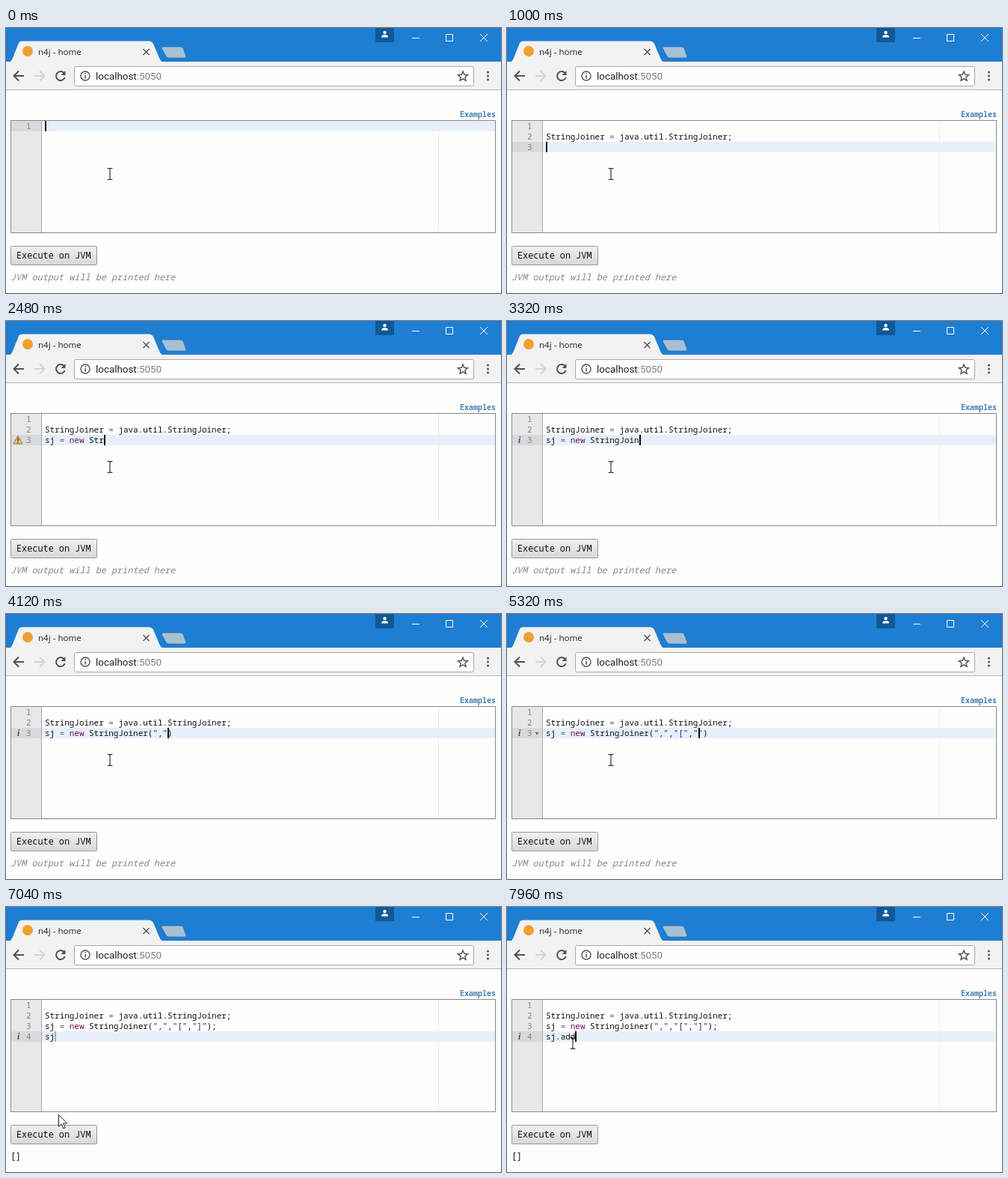
These frames come from a looping animation (662 by 354 pixels, 8000 ms). An HTML page:

```html
<!DOCTYPE html>
<html lang="en">
<head>
<meta charset="utf-8">
<title>n4j - home</title>
<style>
  html, body { margin: 0; width: 100%; height: 100%; overflow: hidden; background: #fefefd; }
  svg { display: block; }
  text { white-space: pre; }
  .mono { font-family: "Noto Sans Mono", "DejaVu Sans Mono", monospace; font-size: 10.95px; fill: #101010; }
  .large { font-size: 11.85px; }
  .ui { font-family: "Open Sans", "Noto Sans", sans-serif; font-size: 11.6px; fill: #202020; }
  .line { fill: none; stroke: #505050; stroke-width: 2; }
  .fine { stroke-width: 1.4; }
  .thin { fill: none; stroke: #fff; stroke-width: 1; }
  .key { fill: #6c1068; }
  .str { fill: #1a1aa6; }
  .op { fill: #505c68; }
</style>
</head>
<body>
<svg width="662" height="354" viewBox="0 0 662 354">
  <defs>
    <linearGradient id="buttonFill" x2="0" y2="1">
      <stop stop-color="#f0f0f0"/><stop offset="1" stop-color="#d8d8d8"/>
    </linearGradient>
  </defs>

  <!-- window frame and tab -->
  <rect width="662" height="354" fill="#fefefd"/>
  <rect width="662" height="46" fill="#1e7ed2"/>
  <rect y="45" width="662" height="37" fill="#f2f2f2"/>
  <path d="M0 82.5H662" stroke="#b8b8b8"/>
  <path d="M4 46Q7 45 9 40L17 20Q18 17.500 22 17.500H191Q195 17.500 197 21L205 40Q207 45 211 46Z" fill="#f2f2f2"/>
  <path d="M210 25H233Q236 25 237 27L241 38Q241 40 239 40H218Q215 40 214 38L208 27Q208 25 210 25Z" fill="#a8c0d4" stroke="#1c68ac" stroke-width=".7"/>
  <circle cx="29" cy="31" r="7" fill="#f0a030"/>
  <text class="ui" x="43" y="36">n4j - home</text>
  <path class="line fine" d="M183.500 28l8 8m0-8l-8 8"/>
  <rect x="494" width="25" height="19" fill="#105898"/>
  <circle cx="506.500" cy="6" r="2.200" fill="#fff"/>
  <path d="M502 12.500Q502 9 506.500 9T511 12.500Z" fill="#fff"/>
  <path class="thin" d="M543 13.500h10M588.500 8.500h9v9h-9zM634 8l10 10m0-10l-10 10"/>

  <!-- toolbar -->
  <path class="line" d="M24 64H11m6-6.500L10.500 64l6.500 6.500"/>
  <path class="line" d="M38 64H51m-6-6.500L51.500 64l-6.500 6.500" style="stroke:#d4d4d4"/>
  <path class="line" d="M77.500 60A6 6 0 1 0 78.700 66"/>
  <path d="M79.500 57v6h-6z" fill="#505050"/>
  <rect x="91.500" y="51.500" width="534" height="26" rx="2" fill="#fefefd" stroke="#a8a8a8"/>
  <circle class="line fine" cx="106" cy="64" r="6"/>
  <path d="M105.300 60h1.500v1.600h-1.500zm0 3h1.500v4.500h-1.500z" fill="#505050"/>
  <text x="120" y="69" font-family="Roboto, sans-serif" font-size="13.400" fill="#202020">localhost<tspan fill="#808080">:5050</tspan></text>
  <path class="line fine" d="M611 58l1.800 4.300 4.700.4-3.600 3 1.100 4.600-4-2.500-4 2.500 1.100-4.600-3.600-3 4.700-.4z"/>
  <g fill="#505050"><circle cx="644.500" cy="59" r="1.500"/><circle cx="644.500" cy="64" r="1.500"/><circle cx="644.500" cy="69" r="1.500"/></g>

  <!-- page -->
  <text class="mono" x="607" y="119" style="font-size:10px;font-weight:bold;fill:#4682b4">Examples</text>
  <rect x="7" y="124" width="41" height="149" fill="#e8e8e9"/>
  <g id="activeRow">
    <rect x="7" y="124" width="41" height="14" fill="#d9d9dc"/>
    <rect x="48" y="124" width="607" height="14" fill="#e7f0fa"/>
  </g>
  <path d="M47.500 124V273" stroke="#a8a8b0"/>
  <path d="M578.500 124V273" stroke="#ebebe6"/>
  <rect x="6.500" y="123.500" width="648" height="150" fill="none" stroke="#888890"/>
  <g id="code"></g>
  <g id="warning">
    <path d="M16 153.500L22 164H10Z" fill="#f4cc60" stroke="#8c6c3c" stroke-linejoin="round"/>
    <path d="M16 156.500v4m0 1v1.500" stroke="#302820" stroke-width="1.400"/>
  </g>
  <text id="info" x="15" y="163" font-family="Liberation Serif, serif" font-size="12" font-weight="bold" font-style="italic" fill="#484848">i</text>
  <path id="fold" d="M37.500 158h5l-2.500 3.500z" fill="#606060"/>
  <rect id="caret" width="2" height="14" fill="#080808"/>
  <rect x="6.500" y="291.500" width="115" height="25" rx="1" fill="url(#buttonFill)" stroke="#989898"/>
  <text class="mono large" x="14" y="308">Execute on JVM</text>
  <text class="mono large" x="6" y="337" id="output"></text>

  <!-- mouse pointers -->
  <path id="beam" d="M-3.500-7.500h2.500l1 1 1-1h2.500M0-6.500v13M-3.500 7.500h2.500l1-1 1 1h2.500" fill="none" stroke="#202020" stroke-width="1.100"/>
  <path id="arrow" d="M.5.5V16.500l3.800-3.600 2.600 6 2.300-1-2.600-5.900h5.200z" fill="#fff" stroke="#202020"/>
</svg>
<script>
const LOOP = 8000, ROW = 14, CHAR = 6.57;
const CLICK = 6680, REFOCUS = 7320;
const $ = id => document.getElementById(id);

// [first key, last key, text]; equal times mean a paste
const bursts = [
  [240, 240, '\n'],
  [520, 520, 'StringJoiner = java.util.StringJoiner;'],
  [880, 880, '\n'],
  [1320, 2440, 'sj = new Str'],
  [2560, 4080, 'ingJoiner(","'],
  [4320, 5280, ',"[","'],
  [5440, 6160, ']");\nsj'],
  [7480, 7920, '.add']
];
const keys = bursts.flatMap(([from, to, text]) => [...text].map((char, i) =>
  ({ char, time: from + (to - from) * i / Math.max(1, text.length - 1) })));

// [time, x, y]
const mousePath = [
  [0, 139, 195], [6200, 139, 195], [6560, 75, 301], [6840, 75, 301],
  [7040, 70, 277], [7280, 88, 182], [LOOP, 88, 182]
];

// Quotes and brackets the editor closes by itself
function autoClose(line) {
  const count = c => line.split(c).length - 1;
  return (count('"') % 2 ? '"' : '') + (count('(') > count(')') ? ')' : '');
}

const highlight = line => line.replace(/"[^"]*"?|\bnew\b|=/g, token => {
  const kind = token[0] === '"' ? 'str' : token === 'new' ? 'key' : 'op';
  return `<tspan class="${kind}">${token}</tspan>`;
});

function mouseAt(t) {
  const i = mousePath.findIndex(p => p[0] > t);
  const [t0, x0, y0] = mousePath[i - 1], [t1, x1, y1] = mousePath[i];
  const k = (t - t0) / (t1 - t0), ease = k * k * (3 - 2 * k);
  return [x0 + (x1 - x0) * ease, y0 + (y1 - y0) * ease];
}

const show = (id, visible) => $(id).setAttribute('visibility', visible ? 'visible' : 'hidden');
const move = (id, x, y) => $(id).setAttribute('transform', `translate(${x} ${y})`);

let drawnCode;
function drawCode(lines) {
  const html = lines.map((line, i) => {
    const y = 135 + i * ROW;
    return `<text class="mono" x="33.5" y="${y}" text-anchor="end" style="fill:#808080">${i + 1}</text>` +
      `<text class="mono" x="52" y="${y}">${highlight(line)}</text>`;
  }).join('');
  if (html !== drawnCode) $('code').innerHTML = drawnCode = html;
}

function draw(now) {
  const t = now % LOOP;
  const typed = keys.filter(key => key.time <= t);
  const lines = typed.map(key => key.char).join('').split('\n');
  const row = lines.length - 1, current = lines[row], column = current.length;
  lines[row] += autoClose(current);
  drawCode(lines);

  move('activeRow', 0, row * ROW);
  move('caret', Math.round(52 + column * CHAR), 124 + row * ROW);
  const blurred = t >= CLICK && t < REFOCUS;
  const lastKey = typed.length ? typed[typed.length - 1].time : 0;
  const lastAction = t >= REFOCUS ? Math.max(REFOCUS, lastKey) : lastKey;
  $('caret').setAttribute('opacity', blurred ? 0.3 : 1);
  show('caret', blurred || (t - lastAction) % 1000 < 500);

  show('warning', t >= 1960 && t < 3320);
  show('info', (t >= 3320 && t < 6080) || t >= 6480);
  move('info', 0, t >= 6480 ? ROW : 0);
  show('fold', /\[[^\]]*$/.test(current));

  const done = t >= CLICK + 80, output = $('output');
  output.textContent = done ? '[]' : 'JVM output will be printed here';
  output.style.fontStyle = done ? 'normal' : 'italic';
  output.style.fill = done ? '#101010' : '#888888';

  const [x, y] = mouseAt(t), overText = x > 48 && y < 273;
  move('beam', x, y);
  move('arrow', x, y);
  show('beam', overText);
  show('arrow', !overText);
  requestAnimationFrame(draw);
}
requestAnimationFrame(draw);
</script>
</body>
</html>
```
